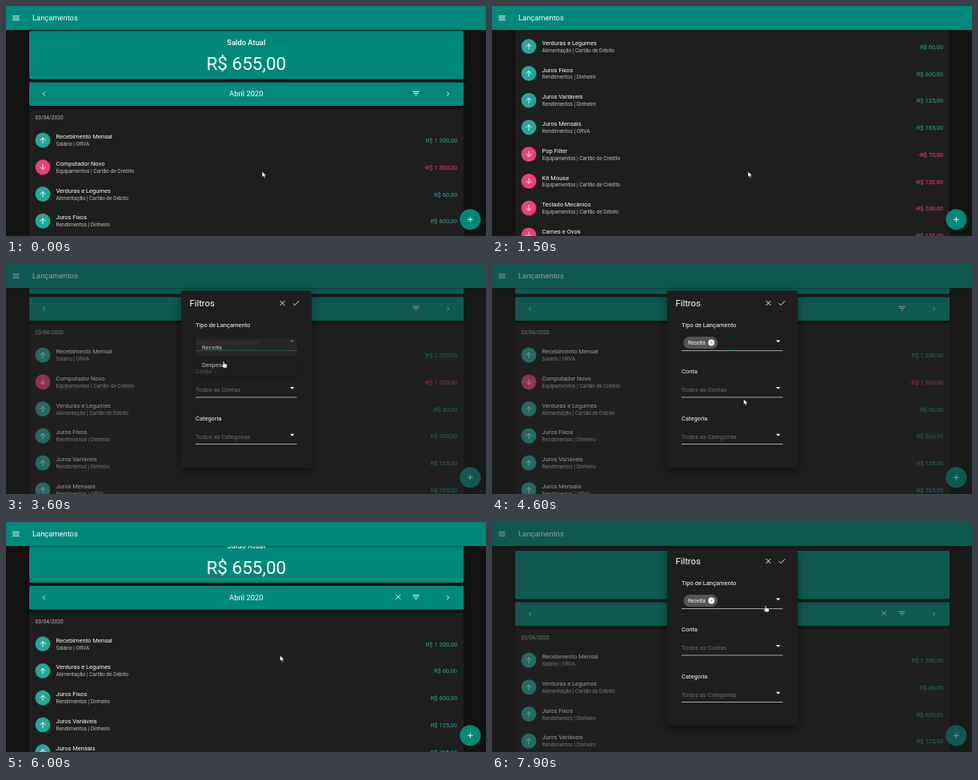
Recreate the animation shown at these times as an HTML page. Size 600 by 288 pixels, loop 8000 ms.

```html
<!DOCTYPE html>
<html lang="pt-BR">
<head>
<meta charset="utf-8">
<style>
  html, body { margin: 0; width: 100%; height: 100%; overflow: hidden; background: #121212; }
  svg { display: block; font-family: Roboto, sans-serif; }
  .card { filter: drop-shadow(0 1px 1px rgba(0,0,0,.4)); }
  .deep { filter: drop-shadow(0 4px 6px rgba(0,0,0,.5)); }
</style>
</head>
<body>
<svg id="stage" width="600" height="288" viewBox="0 0 600 288"></svg>
<script>
const LOOP = 8000, TEAL = '#00897b', UP = '#26a69a', DOWN = '#ec407a';
const SURFACE = '#1e1e1e', MUTED = 'rgba(255,255,255,.7)', HINT = 'rgba(255,255,255,.36)';

const entries = [
  ['Recebimento Mensal', 'Salário | ORVA', 1200],
  ['Computador Novo', 'Equipamentos | Cartão de Crédito', -1500],
  ['Verduras e Legumes', 'Alimentação | Cartão de Débito', 60],
  ['Juros Fixos', 'Rendimentos | Dinheiro', 600],
  ['Juros Variáveis', 'Rendimentos | Dinheiro', 125],
  ['Juros Mensais', 'Rendimentos | ORVA', 785],
  ['Pop Filter', 'Equipamentos | Cartão de Crédito', -70],
  ['Kit Mouse', 'Equipamentos | Cartão de Crédito', -120],
  ['Teclado Mecânico', 'Equipamentos | Cartão de Débito', -200],
  ['Carnes e Ovos', 'Alimentação | Dinheiro', -135],
  ['Leite e derivados', 'Alimentação | Dinheiro', -90]
];

// Icons on a 24 unit grid, drawn with 2 unit strokes
const icons = {
  menu: 'M3 7H21M3 12H21M3 17H21',
  close: 'M5.7 5.7 18.3 18.3M18.3 5.7 5.7 18.3',
  check: 'M4.2 12.8 9 17.6 20.3 6.3',
  filter: 'M3 7H21M6 12H18M10 17H14',
  left: 'M14.7 6.7 9.4 12 14.7 17.3',
  right: 'M9.3 6.7 14.6 12 9.3 17.3',
  up: 'M12 20V5.6M4.8 12.8 12 5.6 19.2 12.8',
  down: 'M12 4V18.4M4.8 11.2 12 18.4 19.2 11.2',
  plus: 'M5 12H19M12 5V19'
};

const money = n => (n < 0 ? '-' : '') + 'R$ ' +
  Math.abs(n).toLocaleString('pt-BR', { minimumFractionDigits: 2 });
const text = (s, x, y, size, fill = '#fff', anchor = 'start', weight = 400) =>
  `<text x="${x}" y="${y + size * .355}" font-size="${size}" fill="${fill}" text-anchor="${anchor}" font-weight="${weight}">${s}</text>`;
const rect = (x, y, w, h, fill, more = '') =>
  `<rect x="${x}" y="${y}" width="${w}" height="${h}" fill="${fill}" ${more}/>`;
const circle = (x, y, r, fill, more = '') =>
  `<circle cx="${x}" cy="${y}" r="${r}" fill="${fill}" ${more}/>`;
const icon = (name, x, y, scale = .469, color = '#fff') =>
  `<path d="${icons[name]}" transform="translate(${x} ${y}) scale(${scale}) translate(-12 -12)" fill="none" stroke="${color}" stroke-width="2"/>`;
const group = (id, body, more = '') => `<g id="${id}" ${more}>${body}</g>`;

function list(rows) {
  const end = 160 + rows.length * 33.75;
  const total = rows.reduce((sum, row) => sum + row[2], 0);
  return rect(29, 134, 543, end - 134, SURFACE, 'class="card" rx="2"') +
    text('03/04/2020', 36.5, 145, 6.6, MUTED) +
    rows.map(([title, detail, value], i) => {
      const y = 173 + i * 33.75, color = value < 0 ? DOWN : UP;
      return circle(46, y, 9.4, color) + icon(value < 0 ? 'down' : 'up', 46, y) +
        text(title, 62.5, y - 4.5, 7.5) + text(detail, 62.5, y + 4.7, 6.56, MUTED) +
        text(money(value), 564, y + .5, 7.5, color, 'end');
    }).join('') +
    rect(29, end, 543, 22.5, '#272727') +
    text('Saldo do Dia: ' + money(total), 564, end + 10.5, 7.5, '#fff', 'end');
}

const field = (label, hint, y, id) =>
  text(label, 237, y, 7.5) + group(id, text(hint, 237, y + 22.7, 7.5, HINT)) +
  `<path d="M355 ${y + 19.5}h5.4l-2.7 2.7z" fill="#fff"/>` +
  rect(237, y + 32, 126.5, .7, '#ddd');

const chip = rect(239.4, 91, 42.6, 15, '#555', 'rx="7.5"') + text('Receita', 245, 98.5, 6.56) +
  circle(274.2, 98.5, 3.9, '#fff') + icon('close', 274.2, 98.5, .24, '#555');

stage.innerHTML =
  rect(0, 0, 600, 288, '#121212') +
  group('page',
    rect(29, 36, 543, 60.5, TEAL, 'class="card" rx="2"') +
    text('Saldo Atual', 300.3, 50.3, 9.375, '#fff', 'middle', 500) +
    text('R$ 655,00', 300.3, 77.3, 22.5, '#fff', 'middle') +
    rect(29, 100.5, 543, 29.5, TEAL, 'class="card" rx="1"') +
    icon('left', 47.5, 115) + icon('right', 552.5, 115) +
    text('Abril 2020', 300.3, 115, 9.375, '#fff', 'middle') +
    icon('filter', 512.5, 114.5) + group('clear', icon('close', 490.2, 114.3)) +
    circle(512.5, 114.5, 11.2, '#fff', 'id="filterRipple"') +
    group('allRows', list(entries)) +
    group('incomeRows', list(entries.filter(row => row[2] > 0)))) +
  rect(0, 0, 600, 30, TEAL, 'class="card"') +
  icon('menu', 12.5, 15) + text('Lançamentos', 33, 15, 9.375) +
  circle(580.3, 267.3, 13.1, TEAL, 'class="card"') + icon('plus', 580.3, 267.3) +
  rect(0, 0, 600, 288, '#212121', 'id="scrim"') +
  group('dialog',
    rect(219, 33.5, 163, 221.5, SURFACE, 'class="deep" rx="2"') +
    text('Filtros', 229.5, 49.2, 11.25) +
    icon('close', 345.5, 49) + icon('check', 362.3, 49) +
    circle(362.3, 49, 8.4, '#fff', 'id="checkRipple"') +
    field('Tipo de Lançamento', 'Todos os Lançamentos', 76, 'typeHint') +
    field('Conta', 'Todos as Contas', 134.6, 'accountHint') +
    field('Categoria', 'Todos as Categorias', 193.2, 'categoryHint') +
    group('chip', chip) +
    rect(-63.25, 107.8, 126.5, 1, UP, 'id="focusLine"')) +
  group('options',
    rect(237, 89, 126.5, 52.5, SURFACE, 'class="card" rx="2"') +
    rect(237, 92.7, 126.5, 22.5, 'rgba(255,255,255,.05)') +
    group('income', text('Receita', 245, 104, 7.5, 'inherit')) +
    text('Despesa', 245, 126.5, 7.5)) +
  group('cursor',
    '<path id="arrow" d="M0 0V7.4L1.8 5.8 3 8.6 4.3 8 3.1 5.3H5.4Z"/>' +
    '<path id="hand" d="M-.8.4Q0-.8.8.4V3L4 3.8Q4.7 4 4.5 5.2L4 8.3H-.4L-2.7 5Q-2.5 3.9-1.6 4.5L-.8 5.2Z"/>',
    'fill="#fff" stroke="#111" stroke-width=".6"');

// Eased interpolation through [time, ...values] keys
function track(t, keys, column = 1) {
  const next = keys.findIndex(key => key[0] > t);
  if (next < 0) return keys[keys.length - 1][column];
  if (next === 0) return keys[0][column];
  const a = keys[next - 1], b = keys[next], u = (t - a[0]) / (b[0] - a[0]);
  return a[column] + (b[column] - a[column]) * u * u * (3 - 2 * u);
}
const rise = (t, start) => 1 - (1 - Math.min(1, Math.max(0, (t - start) / 300))) ** 3;

const scrollKeys = [[0, 5], [700, 267], [1150, 267], [2000, 59], [5850, 59], [6100, 0]];
const cursorKeys = [
  [2050, 320, 207], [2400, 508.5, 50], [2550, 508.5, 50], [2900, 343, 105], [2950, 343, 105],
  [3300, 274, 105], [3480, 274, 105], [3600, 272, 121.7], [3800, 270, 107], [3950, 270, 107],
  [4300, 300, 203], [4450, 300, 203], [4950, 366, 47], [5280, 366, 47], [5400, 344, 139],
  [5650, 342.5, 167], [6250, 342.5, 167], [7050, 510.7, 117.7], [7320, 510.7, 117.7], [7850, 342, 104.5]
];
const filterRippleKeys = [[2300, 0], [2400, .08], [2480, .4], [2560, .4], [2800, 0],
  [6950, 0], [7050, .08], [7120, .08], [7190, .32], [7300, .32], [7600, 0]];
const checkRippleKeys = [[4800, 0], [4950, .08], [5120, .08], [5220, .28], [5500, .28], [5700, 0]];

const byId = id => document.getElementById(id);
const move = (id, transform) => byId(id).setAttribute('transform', transform);
const fade = (id, value) => byId(id).setAttribute('opacity', value);
const show = (id, on) => byId(id).setAttribute('display', on ? 'inline' : 'none');

function draw(now) {
  const t = now % LOOP;
  const open = rise(t, 2485) - rise(t, 5273) + rise(t, 7272);
  const picked = t >= 3850, filtered = t >= 5480;
  const hand = t > 2800 && t < 4100 || t > 4800 && t < 5480 || t > 6900;
  const scale = .5 + .5 * open;
  const focus = rise(t, 3450) - rise(t, 4420);

  move('page', `translate(0 ${-track(t, scrollKeys)})`);
  show('allRows', !filtered);
  show('incomeRows', filtered);
  show('clear', t >= 5290);
  fade('filterRipple', track(t, filterRippleKeys));

  fade('scrim', .46 * open);
  fade('dialog', open);
  move('dialog', `translate(300.5 144) scale(${scale}) translate(-300.5 -144)`);
  fade('checkRipple', track(t, checkRippleKeys));
  show('chip', picked);
  show('typeHint', !picked);
  move('focusLine', `translate(300.25 0) scale(${focus} 1)`);

  fade('options', rise(t, 3495) - rise(t, 4390));
  byId('income').setAttribute('fill', picked ? UP : '#fff');

  move('cursor', `translate(${track(t, cursorKeys)} ${track(t, cursorKeys, 2)})`);
  show('hand', hand);
  show('arrow', !hand);
}

const start = performance.now();
function tick() {
  draw(performance.now() - start);
  requestAnimationFrame(tick);
}
tick();
</script>
</body>
</html>
```
